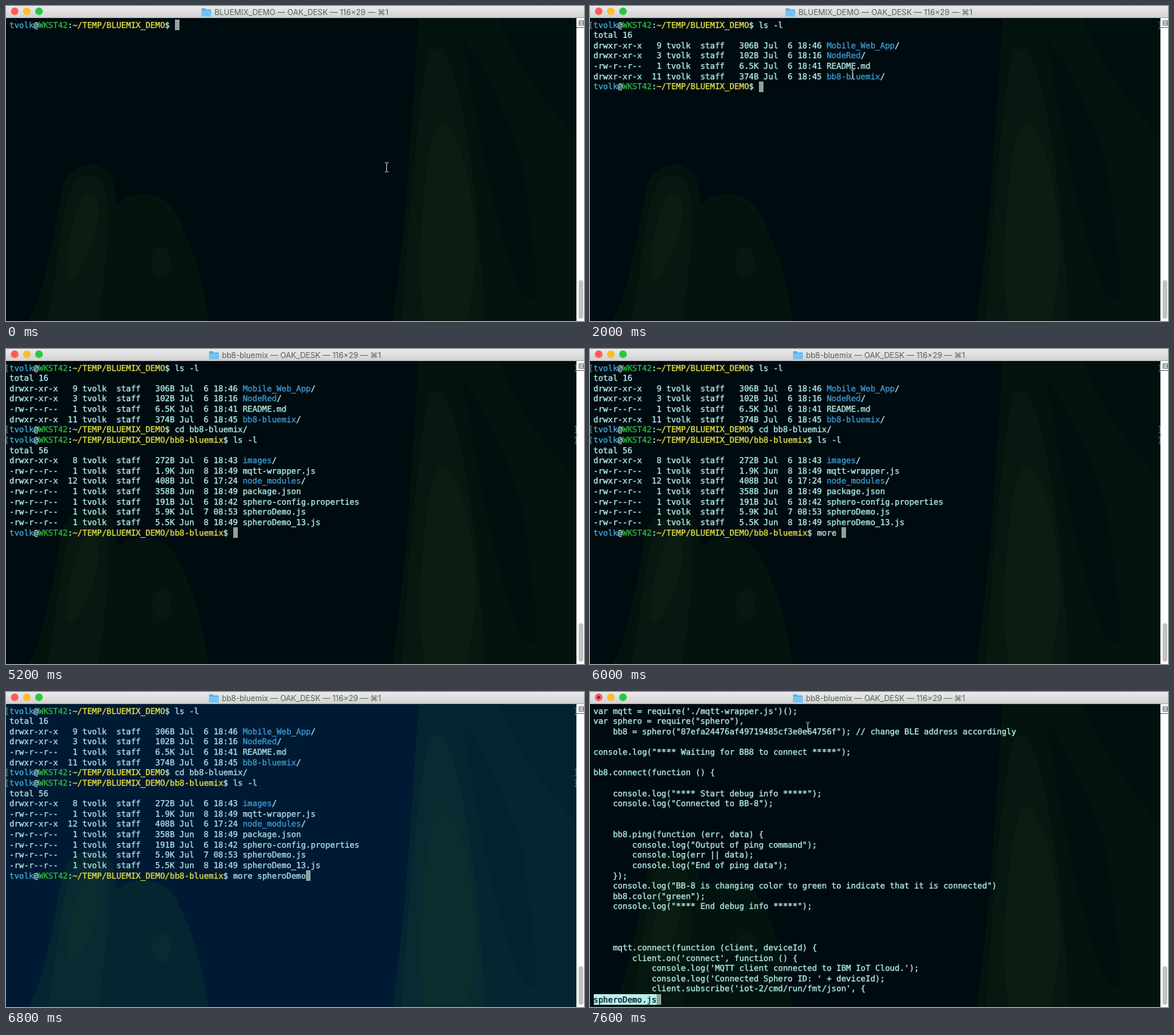
Recreate the animation shown at these times as an HTML page. Size 763 px wide and 417 px high, loop 8 s.

```html
<!DOCTYPE html>
<html lang="en">
<head>
<meta charset="utf-8">
<title>Terminal</title>
<style>
html, body { margin: 0; width: 100%; height: 100%; overflow: hidden; }
body {
  position: relative;
  --base: #000b10; --field: #03140f; --mid: #06180f; --glow: #0b1c10; --leaf: #020f0f; --ink: #b4efee;
}
body.teal { --base: #02233a; --field: #0a2c38; --mid: #0a2c38; --glow: #0d2f37; --leaf: #04223a; --ink: #a4d8de; }
body.navy { --base: #001a33; --field: #052630; --mid: #082a30; --glow: #0b2d2e; --leaf: #032230; --ink: #aee0e8; }
#back, #mouse { position: absolute; left: 0; top: 0; }
#bar {
  position: absolute; left: 0; top: 0; width: 763px; height: 16px;
  background: linear-gradient(#ebebeb, #d2d2d2); border-bottom: 1px solid #b0b0b0; box-sizing: border-box;
  display: flex; justify-content: center; align-items: center; gap: 4px;
  font: 10.2px Inter, "DejaVu Sans", sans-serif; color: #56645c; white-space: pre;
}
#text {
  position: absolute; left: 4.5px; top: 18.5px; margin: 0; color: var(--ink);
  font: 10.66px/13.63px "DejaVu Sans Mono", monospace; -webkit-text-stroke: 0.3px;
  text-rendering: geometricPrecision; font-variant-ligatures: none;
}
.u { color: #45a8d6; }
.h { color: #2fb83a; }
.p { color: #e2e04a; }
.d { color: #3d9bd3; }
.c { background: #8ca39b; padding: 0.5px 0; }
.s { background: var(--ink); color: #00141a; padding: 0.5px 0; }
.m { position: absolute; left: -6.4px; color: #56777c; }
.m.r { left: 744.5px; }
</style>
</head>
<body>
<svg id="back" width="763" height="417">
  <rect width="763" height="417" style="fill:var(--base)"/>
  <g style="fill:var(--field)">
    <path d="M545 17H753V417H510C530 280 535 150 545 17Z"/>
    <path d="M30 417C55 370 62 300 75 240C85 205 125 200 140 228C152 260 150 340 145 417Z"/>
    <path d="M140 417V270C160 240 205 245 222 270C245 310 262 370 267 417Z"/>
  </g>
  <g style="fill:var(--leaf)">
    <path d="M603 40C640 90 670 170 680 200C690 270 700 330 700 385C695 395 685 390 678 375C645 290 625 180 603 40Z"/>
    <path d="M650 17C680 90 715 130 753 175V17Z"/>
  </g>
  <g style="fill:var(--mid)">
    <path d="M575 55C600 85 625 250 632 417H522C530 300 545 100 560 60Z"/>
    <path d="M55 417C68 350 72 270 88 235C105 215 128 225 134 255C138 310 128 370 122 417Z"/>
    <ellipse cx="205" cy="338" rx="13" ry="20"/>
  </g>
  <g style="fill:var(--glow)">
    <path d="M577 153C600 155 620 260 620 320C620 360 612 417 605 417H552C547 380 545 330 548 300C552 230 560 153 577 153Z"/>
    <path d="M82 362C76 340 86 270 104 250C118 240 126 260 121 290C114 325 94 362 82 362Z"/>
  </g>
  <path fill="#fff" d="M753 16H763V417H753Z"/>
  <rect x="756" y="363" width="6" height="51" rx="3" fill="#c2c2c2"/>
  <path fill="none" stroke="#777" d="M753 28.5H763M756.5 19.5H762.5V25.5H756.5ZM757 21.5H762M757 23.5H762"/>
</svg>
<div id="bar">
  <svg width="13" height="12"><path fill="#58aee6" d="M0 2Q0 1 1 1H5L6 2.500H12Q13 2.500 13 3.500V11H0Z"/><path fill="#72c5f5" d="M0 4H13V11Q13 12 12 12H1Q0 12 0 11Z"/></svg><span id="title"></span>
  <svg width="50" height="16" style="position:absolute;left:0;top:-1px">
    <circle cx="11.500" cy="8" r="5" fill="#fc5b57"/><circle cx="27.500" cy="8" r="5" fill="#fdbc2e"/><circle cx="43.500" cy="8" r="5" fill="#27c840"/>
    <circle id="busy" cx="11.500" cy="8" r="1.800" fill="#7d1512"/>
  </svg>
</div>
<pre id="text"></pre>
<svg id="mouse" width="763" height="417">
  <path id="beam" fill="none" stroke="#b5bdb8" d="M-2.500 -6.500Q0 -6.500 0 -4.500Q0 -6.500 2.500 -6.500M0 -5V5M-2.500 6.500Q0 6.500 0 4.500Q0 6.500 2.500 6.500"/>
</svg>
<script>
const STEP = 400, STEPS = 20;
const USER = 'tvolk', HOST = 'WKST42', PROFILE = 'OAK_DESK';
const HOME = 'BLUEMIX_DEMO', SUB = 'bb8-bluemix';
const $ = id => document.getElementById(id);
const span = (cls, s) => `<span class="${cls}">${s}</span>`;

const prompt = dir => span('u', USER) + '@' + span('h', HOST) + ':' + span('p', '~/TEMP/' + dir) + '$ ';
const done = (dir, cmd) => span('m', '[') + prompt(dir) + cmd + span('m r', ']');
const live = (dir, typed) => prompt(dir) + typed + span('c', ' ');

// One "ls -l" row; a trailing slash marks a directory.
function entry(row) {
  const [links, size, month, day, time, name] = row.split(' ');
  const dir = name.endsWith('/');
  return (dir ? 'drwxr-xr-x' : '-rw-r--r--') + links.padStart(4) + ` ${USER}  staff` + size.padStart(7) +
    ` ${month}${day.padStart(3)} ${time} ` + (dir ? span('d', name.slice(0, -1)) + '/' : name);
}
const listing = (total, rows) => ['total ' + total, ...rows.map(entry)];

const homeList = listing(16, [
  '9 306B Jul 6 18:46 Mobile_Web_App/',
  '3 102B Jul 6 18:16 NodeRed/',
  '1 6.5K Jul 6 18:41 README.md',
  '11 374B Jul 6 18:45 bb8-bluemix/'
]);
const subList = listing(56, [
  '8 272B Jul 6 18:43 images/',
  '1 1.9K Jun 8 18:49 mqtt-wrapper.js',
  '12 408B Jul 6 17:24 node_modules/',
  '1 358B Jun 8 18:49 package.json',
  '1 191B Jul 6 18:42 sphero-config.properties',
  '1 5.9K Jul 7 08:53 spheroDemo.js',
  '1 5.5K Jun 8 18:49 spheroDemo_13.js'
]);
const pager = `var mqtt = require('./mqtt-wrapper.js')();
var sphero = require("sphero"),
    bb8 = sphero("87efa24476af49719485cf3e0e64756f"); // change BLE address accordingly

console.log("**** Waiting for BB8 to connect *****");

bb8.connect(function () {

    console.log("**** Start debug info *****");
    console.log("Connected to BB-8");


    bb8.ping(function (err, data) {
        console.log("Output of ping command");
        console.log(err || data);
        console.log("End of ping data");
    });
    console.log("BB-8 is changing color to green to indicate that it is connected")
    bb8.color("green");
    console.log("**** End debug info *****");



    mqtt.connect(function (client, deviceId) {
        client.on('connect', function () {
            console.log('MQTT client connected to IBM IoT Cloud.');
            console.log('Connected Sphero ID: ' + deviceId);
            client.subscribe('iot-2/cmd/run/fmt/json', {
` + span('s', 'spheroDemo.js') + span('c', ' ');

// Text on the current command line, by step.
const typed = { 1: 'l', 2: 'ls -l', 8: 'cd bb8-bluemix/', 12: 'ls -', 15: 'more ', 16: 'more sphero', 17: 'more spheroDemo' };
// Pointer position, by step; hidden otherwise.
const pointer = { 0: [502, 213], 3: [367, 64], 4: [355, 54], 5: [346, 90], 6: [341, 113], 19: [287, 46] };
const palette = { 16: 'teal', 17: 'navy' };

function screen(n) {
  if (n >= 18) return pager;
  const path = HOME + '/' + SUB, lines = [];
  if (n >= 3) lines.push(done(HOME, 'ls -l'), ...homeList);
  if (n >= 9) lines.push(done(HOME, 'cd bb8-bluemix/'));
  if (n >= 13) lines.push(done(path, 'ls -l'), ...subList);
  lines.push(live(n >= 9 ? path : HOME, typed[n] || ''));
  return lines.join('\n');
}

function show(n) {
  $('text').innerHTML = screen(n);
  $('title').textContent = `${n >= 9 ? SUB : HOME} — ${PROFILE} — 116×29 — ⌘1`;
  $('busy').style.display = n >= 18 ? '' : 'none';
  document.body.className = palette[n] || '';
  const at = pointer[n];
  $('mouse').style.display = at ? '' : 'none';
  if (at) $('beam').setAttribute('transform', `translate(${at[0] + 0.5} ${at[1] + 0.5})`);
}

let last = -1;
function tick() {
  const n = Math.floor(performance.now() / STEP) % STEPS;
  if (n !== last) show(last = n);
  requestAnimationFrame(tick);
}
tick();
</script>
</body>
</html>
```
